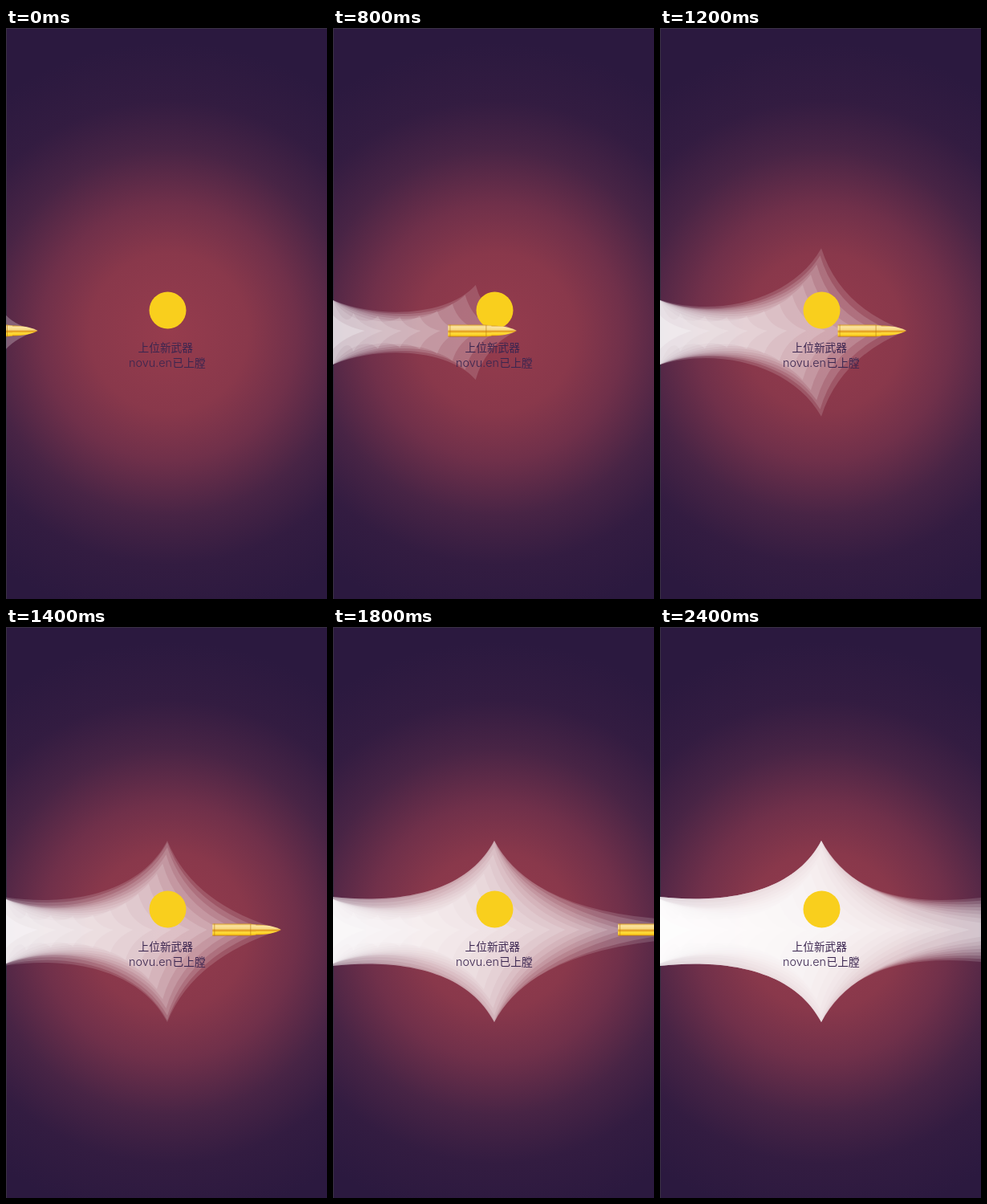
Animation, 400 px wide and 711 px high, one loop 2700 ms. Source, as an HTML page:

```html
<!DOCTYPE html>
<html lang="zh">
<head>
<meta charset="utf-8">
<style>
  html, body { margin: 0; width: 100%; height: 100%; overflow: hidden; background: #2b193f; }
  svg { display: block; width: 100vw; height: 100vh; }
  text { fill: #3b2650; font: 300 13.7px "Noto Sans CJK SC", "Noto Sans CJK", sans-serif; }
  .latin { font: 300 14.4px Inter, "Liberation Sans", sans-serif; }
</style>
</head>
<body>
<svg viewBox="0 0 400 711" preserveAspectRatio="none">
  <defs>
    <radialGradient id="glow" gradientUnits="userSpaceOnUse" cx="203" cy="379" r="380">
      <stop offset="0" stop-color="#963c4d"/>
      <stop offset=".26" stop-color="#89384b"/>
      <stop offset=".42" stop-color="#70304a"/>
      <stop offset=".6" stop-color="#482445"/>
      <stop offset=".76" stop-color="#331c41"/>
      <stop offset=".95" stop-color="#2b193f"/>
    </radialGradient>
    <linearGradient id="brass" x2="0" y2="1">
      <stop offset="0" stop-color="#d9a02c"/>
      <stop offset=".15" stop-color="#fbe3a0"/>
      <stop offset=".42" stop-color="#f7d780"/>
      <stop offset=".55" stop-color="#e0981c"/>
      <stop offset=".72" stop-color="#ffdf3c"/>
      <stop offset=".9" stop-color="#fbc81e"/>
      <stop offset="1" stop-color="#bd7610"/>
    </linearGradient>
  </defs>
  <rect width="400" height="711" fill="url(#glow)"/>
  <path d="M0 .5H400M.5 0V711" stroke="#3a3044" fill="none"/>
  <g id="waves" fill="#fff"></g>
  <circle cx="201.5" cy="351.5" r="23" fill="#f9cf1d"/>
  <g id="bullet" fill="url(#brass)">
    <path d="M53 370.5C68 370.5 78 373 85.5 377C78 381 68 383.5 53 383.5Z"/>
    <path d="M0 369.5H47L54 370.5V383.5L47 384.5H0Z"/>
    <path d="M2.5 369.5V384.5M47.5 370V384" stroke="#b8780f" stroke-opacity=".6"/>
  </g>
  <text x="164.5" y="403">上位新武器</text>
  <text x="153" y="422" class="latin">novu.en</text>
  <text x="207.5" y="422">已上膛</text>
</svg>
<script>
const STEP = 100, LAST = 24, LOOP = 2700, MID = 379, WIDTH = 400;
const waves = document.getElementById('waves');
const bullet = document.getElementById('bullet');

const ramp = (k, from, to) => Math.min(1, Math.max(0, (k - from) / (to - from)));
const smooth = (k, from, to) => {
  const u = ramp(k, from, to);
  return u * u * (3 - 2 * u);
};

// Steady flight with a slight surge and lag
const tail = k => -46 + 22.3 * k + 11 * Math.sin(Math.PI * (k / 12) ** 1.7);

// One half of the shock wave; side is -1 for the top, 1 for the bottom
function half(k, side) {
  const x = 201 - 209 * (1 - ramp(k, 0, 12)) ** 2;
  const h = 18 + 15 * .4 ** k + 95 * smooth(k, 3, 14);
  const swell = smooth(k, 11, 15);
  const exit = 40 * ramp(k, 16, 24) ** .75;
  const end = Math.min(WIDTH, tail(k) + 85.5);
  const y = d => MID + side * d;
  return [
    [0, y(40 + 3 * swell)], [.35 * x, y(15 + 20 * swell)], [.82 * x, y(.38 * h)],
    [x, y(h)], [x + .22 * (end - x), y(.3 * h - .25 * exit)],
    [end, 377 + side * exit]
  ];
}

function wavePath(k) {
  const [a, b, c, d, e, f] = half(k, -1);
  const [p, q, r, s, t, u] = half(k, 1);
  return `M${a}C${b} ${c} ${d}Q${e} ${f}L${u}Q${t} ${s}C${r} ${q} ${p}Z`;
}

const layers = Array.from({ length: LAST + 1 }, (_, k) => {
  const path = document.createElementNS('http://www.w3.org/2000/svg', 'path');
  path.setAttribute('d', wavePath(k));
  path.setAttribute('fill-opacity', k ? .15 : .26);
  return waves.appendChild(path);
});

const start = performance.now();
function draw() {
  const time = (performance.now() - start) % LOOP;
  const k = Math.min(LAST, Math.floor(time / STEP));
  layers.forEach((path, i) => path.style.display = i <= k ? '' : 'none');
  bullet.setAttribute('transform', `translate(${tail(k)})`);
  requestAnimationFrame(draw);
}
draw();
</script>
</body>
</html>
```
